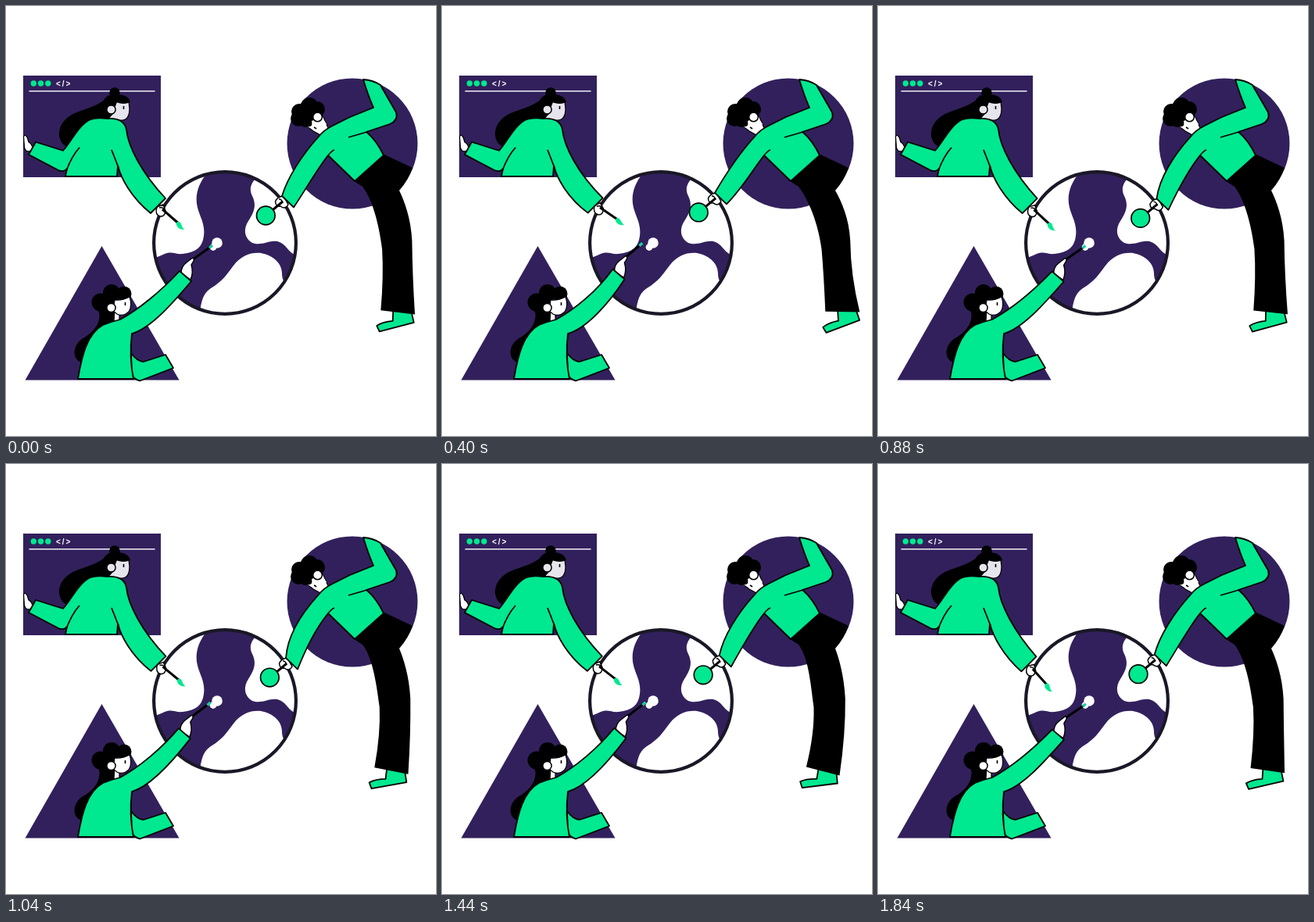
An HTML page with a canvas that plays this animation: 550x550 px, repeating every 1920 ms.

```html
<!DOCTYPE html>
<html lang="en">
<head>
<meta charset="utf-8">
<style>
html, body { margin: 0; width: 100%; height: 100%; overflow: hidden; background: #fff; }
canvas { display: block; width: 550px; height: 550px; }
</style>
</head>
<body>
<canvas id="stage" width="550" height="550"></canvas>
<script>
const ctx = document.getElementById('stage').getContext('2d');
const LOOP = 1920, STEP = 80;
const PURPLE = '#32205c', GREEN = '#00e890', BLACK = '#000', WHITE = '#fff', SKIN = '#e6e4ec';

// Offsets in pixels over the loop: [time, value]
const brushKeys = [[0, 0], [240, 4], [400, 4], [480, 2.5], [640, 2], [880, -1], [960, -.5],
  [1200, 4], [1360, 3.6], [1440, 2], [1640, 0], [1840, -4]];
const penKeys = [[0, 0], [240, -9.3], [400, -8.5], [480, -4.5], [640, 0], [880, 1.5], [960, .5],
  [1200, -9.3], [1360, -8], [1440, -4], [1600, .5], [1840, 2]];
const rollerKeys = [[0, 0], [200, -2.3], [440, -4.2], [640, -3.2], [880, 3.4], [1080, 5.2],
  [1200, 4.7], [1440, 1.8], [1840, .7]];

// Periodic cubic through the keys
function track(keys, t) {
  const n = keys.length;
  const at = i => {
    const turn = Math.floor(i / n), k = keys[i - turn * n];
    return [k[0] + turn * LOOP, k[1]];
  };
  let i = n - 1;
  while (keys[i][0] > t) i--;
  const [a, b, c, d] = [at(i - 1), at(i), at(i + 1), at(i + 2)];
  const span = c[0] - b[0], u = (t - b[0]) / span;
  const m1 = (c[1] - a[1]) / (c[0] - a[0]) * span;
  const m2 = (d[1] - b[1]) / (d[0] - b[0]) * span;
  const u2 = u * u, u3 = u2 * u;
  return (2 * u3 - 3 * u2 + 1) * b[1] + (u3 - 2 * u2 + u) * m1 +
    (3 * u2 - 2 * u3) * c[1] + (u3 - u2) * m2;
}

// Leg swing, 0 = left, 1 = right
function swing(t) {
  const ease = u => (1 - Math.cos(Math.PI * u)) / 2;
  if (t >= 560 && t < 1280) return 1 - ease((t - 560) / 720);
  return ease(((t + LOOP - 1280) % LOOP) / 1200);
}

function shape(d, fill, stroke, width = 1.8) {
  const p = new Path2D(d);
  if (fill) { ctx.fillStyle = fill; ctx.fill(p); }
  if (stroke) { ctx.strokeStyle = stroke; ctx.lineWidth = width; ctx.stroke(p); }
}
const line = (d, color = BLACK, width = 1.8) => shape(d, null, color, width);

function disc(x, y, r, fill, stroke, width = 1.8) {
  ctx.beginPath();
  ctx.arc(x, y, r, 0, Math.PI * 2);
  if (fill) { ctx.fillStyle = fill; ctx.fill(); }
  if (stroke) { ctx.strokeStyle = stroke; ctx.lineWidth = width; ctx.stroke(); }
}
const discs = (list, fill) => list.forEach(([x, y, r]) => disc(x, y, r, fill));

function moved(x, y, dx, dy, angle, draw) {
  ctx.save();
  ctx.translate(x + dx, y + dy);
  ctx.rotate(angle);
  ctx.translate(-x, -y);
  draw();
  ctx.restore();
}

function globe() {
  disc(280, 303, 91, PURPLE);
  ctx.save();
  ctx.beginPath();
  ctx.arc(280, 303, 90, 0, 7);
  ctx.clip();
  shape('M257 214 C246 227 241 243 245 258 C248 270 255 279 253 294 C251 308 244 315 226 317 ' +
    'C216 318 213 313 203 317 C197 320 193 321 184 325 L180 215 Z', WHITE);
  shape('M322 217 C312 228 311 235 315 243 C321 255 317 264 310 275 C303 286 305 297 315 303 ' +
    'C329 308 340 296 352 303 C361 308 362 319 378 320 L380 215 Z', WHITE);
  shape('M247 398 C250 376 252 368 262 361 C277 352 282 344 291 332 C301 319 313 315 326 316 ' +
    'C343 319 353 330 353 342 C353 352 357 357 368 358 L350 405 Z', WHITE);
  ctx.restore();
  disc(280, 303, 90.9, null, '#1a1826', 4.2);
  disc(270, 303, 6.8, WHITE);
  disc(265, 308.5, 4.4, WHITE);
}

function browserPane() {
  ctx.fillStyle = PURPLE;
  ctx.fillRect(22, 89, 176, 130);
  discs([[35.3, 99, 3.7], [44.5, 99, 3.7], [53.8, 99, 3.7]], GREEN);
  ctx.fillStyle = WHITE;
  ctx.font = 'bold 10px "Liberation Sans", sans-serif';
  ctx.letterSpacing = '2px';
  ctx.fillText('</>', 64, 102.5);
  line('M29.5 108.8 H190.5', '#d8d4e4', 1.8);
}

function paneWoman(a) {
  shape('M130 117 C118 127 107 130 96 134 C79 139 67 150 68 166 C70 175 74 181 84 180 ' +
    'L126 158 L140 140 Z', BLACK);
  disc(139, 111, 6.8, BLACK);
  shape('M139 122 Q150 126 157 123 L158 131 Q158 145 149 146 L128 146 Q136 140 139 133 Z', SKIN, BLACK, 1.2);
  shape('M124 122 Q130 110 144 113 Q157 114 159 123 Q151 126 142 123 L137 136 L127 142 Z', BLACK);
  disc(134.5, 132.5, 5.6, SKIN, BLACK, 1.5);
  line('M150.5 128 V132', BLACK, 1.6);

  shape('M32 185 Q25 188 23.5 181 L22.5 167 Q25 163 27.5 169 L29 174 Q34 177 34 183 Z', WHITE, BLACK, 1.3);
  const hx = .4 * a, hy = -.1 * a;
  moved(196, 256, .4 * a, -.45 * a, -.03 * a, () => {
    shape('M193 257 Q190 267 197 269 Q203 270 204 262 L201 254 Z', WHITE, BLACK, 1.5);
    line('M200 260 L220 277.5', BLACK, 3);
    line('M196 258 Q202 257 204 263', BLACK, 1.5);
    shape('M217.5 277.5 Q222 273.5 224 279 Q225 283 228 286 Q218 286 217.5 277.5 Z', GREEN);
  });
  shape(`M106 146 Q114 142 130 144 Q151 143 154 158 C156 180 174 214 ${204 + hx} ${246 + hy}
    L${185 + hx} ${265 + hy} C160 245 147 220 143 204 L142 218 H76 L78 208
    Q74 213 67 210 L29 190 L38 174 L73 185 C83 174 92 154 106 146 Z`, GREEN, BLACK);
  line('M135 184 Q139 194 144 207');
  line('M77 211 Q84 192 94 181');
}

function triangleWoman(b) {
  shape('M122.5 307 L221.5 478.5 H24.5 Z', PURPLE);
  shape('M117 380 C124 402 116 413 102 423 C82 432 84 457 101 456 L136 426 L140 392 Z', BLACK);
  discs([[121, 379, 11.5], [135, 367, 11], [151, 368, 9.5], [130, 385, 13]], BLACK);
  shape('M139 386 L138 404 L145 403 V394 Z', WHITE, BLACK, 1.2);
  shape('M139 376 Q149 377 158 372 Q162 383 157 391 Q150 398 142 394 L137 390 Z', WHITE, BLACK, 1.2);
  disc(134.5, 386, 5.6, WHITE, BLACK, 1.5);
  line('M152.5 379 V383', BLACK, 1.6);

  const hx = .42 * b, hy = .3 * b;
  const tx = .9 * b, ty = .33 * b;
  line(`M${235 + hx} ${327 + hy} L${261 + tx} ${308.5 + ty}`, BLACK, 3);
  line(`M${260 + tx} ${309.5 + ty} L${264 + tx} ${306 + ty}`, '#17cfa0', 3.4);
  moved(230, 340, hx, hy, 0, () => {
    shape('M224 342 Q224 333 231 328 L238 322.5 Q241 322 240 326 L237 331 Q240 341 236 350 Z', WHITE, BLACK, 1.4);
  });
  shape('M160 444 Q168 455 176 455 L204 446 L214 463 L171 479.5 Q164 477 161 472 Z', GREEN, BLACK);
  shape(`M124 408 Q134 404 146 401 C170 388 199 364 ${222 + hx} ${339 + hy}
    L${237 + hx} ${352 + hy} C215 378 186 412 161 419 C158 444 160 462 163 477 H92
    C97 447 104 419 124 408 Z`, GREEN, BLACK);
}

function leg(s) {
  const cx = 486 + 27.5 * s, cy = 393 - 2 * s, tilt = (s - .55) * -15 * Math.PI / 180;
  moved(501, 392, cx - 501, cy - 392, tilt, () => {
    shape('M495 390 L494.5 403 Q482 404 474 409 L477.5 416.5 L521.5 405 L518 390 Z', GREEN, BLACK);
  });
  const hem = x => {
    const r = tilt + .12;
    return `${cx + x * Math.cos(r)} ${cy + x * Math.sin(r)}`;
  };
  const inner = 474 + 11 * s, outer = 515 + 7 * s;
  shape(`M484 190 L520 207 A83.5 83.5 0 0 1 503 236
    C${508 + 3 * s} 250 ${outer - 1} 271 ${outer + .5} 300
    Q${outer + 1} 345 ${hem(22)} L${hem(-22)}
    Q${inner + 2 + 2 * s} 345 ${inner + 1} 311 C${inner - 3} 278 468 246 456 231 L445 224 Z`, BLACK);
}

function circleWoman(d, s) {
  leg(s);
  shape('M384 153 L393 160 L404 166 L412 156 L405 140 Z', WHITE, BLACK, 1.2);
  discs([[388, 128, 11], [375, 135, 10], [398, 132, 10], [374, 144, 10], [384, 143, 12]], BLACK);
  shape('M391 147 Q393 157 385 154 L399 161 L410 151 L404 142 Z', WHITE);
  disc(398.5, 142, 5.8, WHITE, BLACK, 1.5);
  line('M394 155 L397 157', BLACK, 1.6);

  moved(354, 250, d, d, 0, () => {
    shape('M355 243 Q347 244 344.5 250 Q345 257 351 256 Q357 261 361 254 Z', WHITE, BLACK, 1.5);
    line('M354 250 L341 261', BLACK, 3);
    line('M349 247 Q353 247 354 252', BLACK, 1.4);
    disc(332.3, 268, 11.8, GREEN, BLACK, 1.7);
  });
  shape(`M457 94 Q470 95 479 101 Q481 105 484 110 L499 136 Q502 146 491 151 L461 161
    Q474 172 483 191 L446 224 L412 191 C399 207 385 232 ${368 + d} ${257.5 + d}
    L${353 + d} ${243 + d} C360 220 378 191 400 167 Q406 159 418 153 L440 142 L470 130
    Q463 114 457 94 Z`, GREEN, BLACK);
  line('M438 168 L462 161');
  line('M412 191 Q417 185 420 184', BLACK, 1.4);
}

function draw(t) {
  ctx.fillStyle = WHITE;
  ctx.fillRect(0, 0, 550, 550);
  ctx.lineJoin = 'round';
  browserPane();
  disc(443, 176, 83.5, PURPLE);
  globe();
  paneWoman(track(brushKeys, t));
  triangleWoman(track(penKeys, t));
  circleWoman(track(rollerKeys, t), swing(t));
}

const start = performance.now();
function tick() {
  const t = (performance.now() - start) % LOOP;
  draw(Math.floor(t / STEP) * STEP);
  requestAnimationFrame(tick);
}
tick();
</script>
</body>
</html>
```
